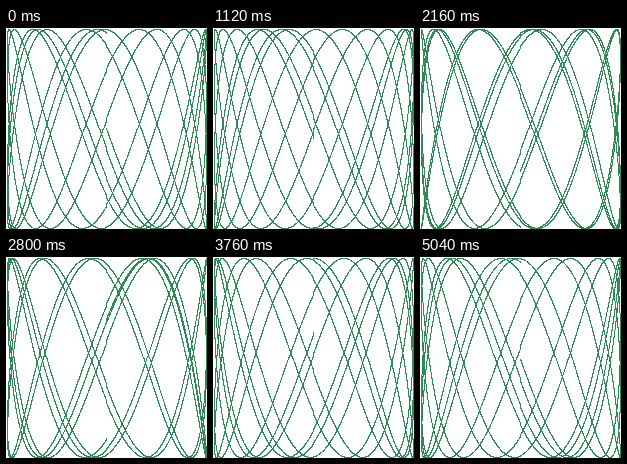
Recreate the animation shown at these times as an HTML page with a canvas. Size 201 by 201 pixels, loop 5.12 s.

```html
<!DOCTYPE html>
<html lang="en">
<head>
<meta charset="utf-8">
<title>Lissajous</title>
<style>
  html, body { margin: 0; width: 100%; height: 100%; overflow: hidden; background: #fff; }
  canvas { display: block; width: 201px; height: 201px; image-rendering: pixelated; }
</style>
</head>
<body>
<canvas id="stage" width="201" height="201"></canvas>
<script>
  const RADIUS = 100;
  const SIZE = 2 * RADIUS + 1;
  const CYCLES = 5;
  const RES = 0.001;
  const FREQ = 2.7588;
  const STEPS = 64;
  const DELAY = 80;
  const GREEN = 0xff578b2e; // ABGR

  const ctx = document.getElementById('stage').getContext('2d');
  const image = ctx.createImageData(SIZE, SIZE);
  const pixels = new Uint32Array(image.data.buffer);

  const toPixel = v => RADIUS + Math.trunc(v * RADIUS + 0.5);

  function draw(phase) {
    pixels.fill(0xffffffff);
    for (let t = 0; t < CYCLES * 2 * Math.PI; t += RES) {
      const x = toPixel(Math.sin(t));
      const y = toPixel(Math.sin(t * FREQ + phase));
      pixels[y * SIZE + x] = GREEN;
    }
    ctx.putImageData(image, 0, 0);
  }

  let shown = -1;
  function tick() {
    const step = Math.floor(performance.now() / DELAY) % STEPS;
    if (step !== shown) {
      shown = step;
      draw(step * 0.1);
    }
    requestAnimationFrame(tick);
  }
  tick();
</script>
</body>
</html>
```
